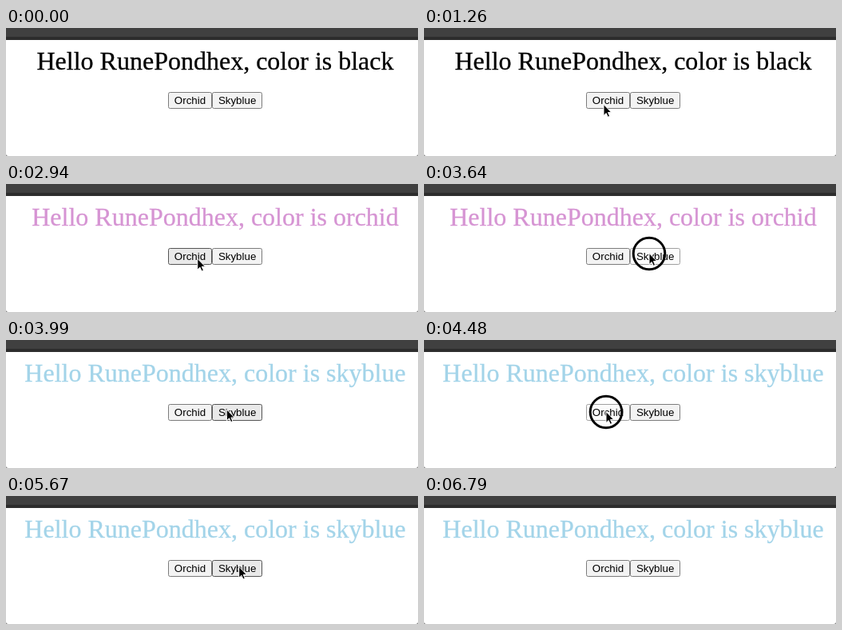
Recreate the animation shown at these times as an HTML page. Size 516x160 px, loop 7.14 s.

```html
<!DOCTYPE html>
<html lang="en">
<head>
<meta charset="utf-8">
<style>
  html, body { margin: 0; width: 100%; height: 100%; overflow: hidden; background: #fff; }
  svg { display: block; }
  text { text-anchor: middle; font-kerning: none; }
  #title { font: 32px "Liberation Serif", serif; stroke-width: .3; }
  .button text { font: 13.333px "Liberation Sans", sans-serif; }
  .button rect { fill: #f3f3f3; stroke: #7c7c7c; }
  .button.hover rect { fill: #e9e9e9; stroke: #555; }
  .button.active rect { fill: #fbfbfb; stroke: #a0a0a0; }
</style>
</head>
<body>
<svg width="516" height="160" viewBox="0 0 516 160">
  <rect width="516" height="11" fill="#404040"/>
  <rect y="11" width="516" height="4" fill="#2d2d2d"/>
  <path d="M0 157q0 3 3 3H0zM516 157q0 3-3 3h3z" fill="#777"/>
  <text id="title" x="262" y="52"></text>
  <g class="button">
    <rect x="203.5" y="80.5" width="54" height="20" rx="2"/>
    <text x="230.5" y="95">Orchid</text>
  </g>
  <g class="button">
    <rect x="258.5" y="80.5" width="62" height="20" rx="2"/>
    <text x="289.6" y="95">Skyblue</text>
  </g>
  <g id="pointer">
    <circle id="ring" r="19.8" fill="none" stroke="#000" stroke-width="3"/>
    <path d="M0-.5V13.5L3.2 10.5 5.3 15.3 7.6 14.3 5.5 9.6H9.8Z" fill="#000" stroke="#fff" stroke-width="1"/>
  </g>
</svg>
<script>
const LOOP = 7140, STEP = 70;
const $ = id => document.getElementById(id);
const buttons = [...document.querySelectorAll('.button')];

// Pointer moves: [start, end, x, y]
const start = [254, 172];
const moves = [
  [840, 1260, 225, 96],
  [2800, 3220, 282, 87],
  [3920, 4270, 228, 90],
  [4760, 5180, 293, 89],
  [5600, 5810, 288, 88],
  [5880, 5950, 287, 88],
  [6020, 6790, 292, 166]
];
// The first press only focuses the window, so it has no effect on the page.
const presses = [[1610, 1960], [2520, 2590], [3570, 3710], [4410, 4690], [5390, 5670]];
const colors = [
  [0, 'black', '#000'],
  [2590, 'orchid', '#d694d3'],
  [3710, 'skyblue', '#a3d4e9'],
  [4690, 'orchid', '#d694d3'],
  [5670, 'skyblue', '#a3d4e9']
];

const ease = p => p * p * (3 - 2 * p);

function pointerAt(t) {
  let [x, y] = start;
  for (const [from, to, endX, endY] of moves) {
    if (t <= from) break;
    const p = ease(Math.min(1, (t - from) / (to - from)));
    x += (endX - x) * p;
    y += (endY - y) * p;
  }
  return [x, y];
}

function render(now) {
  const t = Math.floor(now % LOOP / STEP) * STEP;
  const [x, y] = pointerAt(t);
  const pressed = presses.some(([down, up]) => t >= down && t < up);
  const [, name, color] = colors.findLast(([at]) => t >= at);

  $('title').textContent = `Hello RunePondhex, color is ${name}`;
  $('title').setAttribute('fill', color);
  $('title').setAttribute('stroke', color);
  $('pointer').setAttribute('transform', `translate(${x} ${y})`);
  $('ring').style.display = pressed ? '' : 'none';

  const focused = t >= 2520;
  buttons.forEach((button, i) => {
    const [left, right] = [[203, 258], [258, 321]][i];
    const over = focused && x >= left && x < right && y >= 80 && y < 101;
    button.classList.toggle('hover', over);
    button.classList.toggle('active', over && pressed);
  });
}

function tick() {
  render(performance.now());
  requestAnimationFrame(tick);
}
tick();
</script>
</body>
</html>
```
